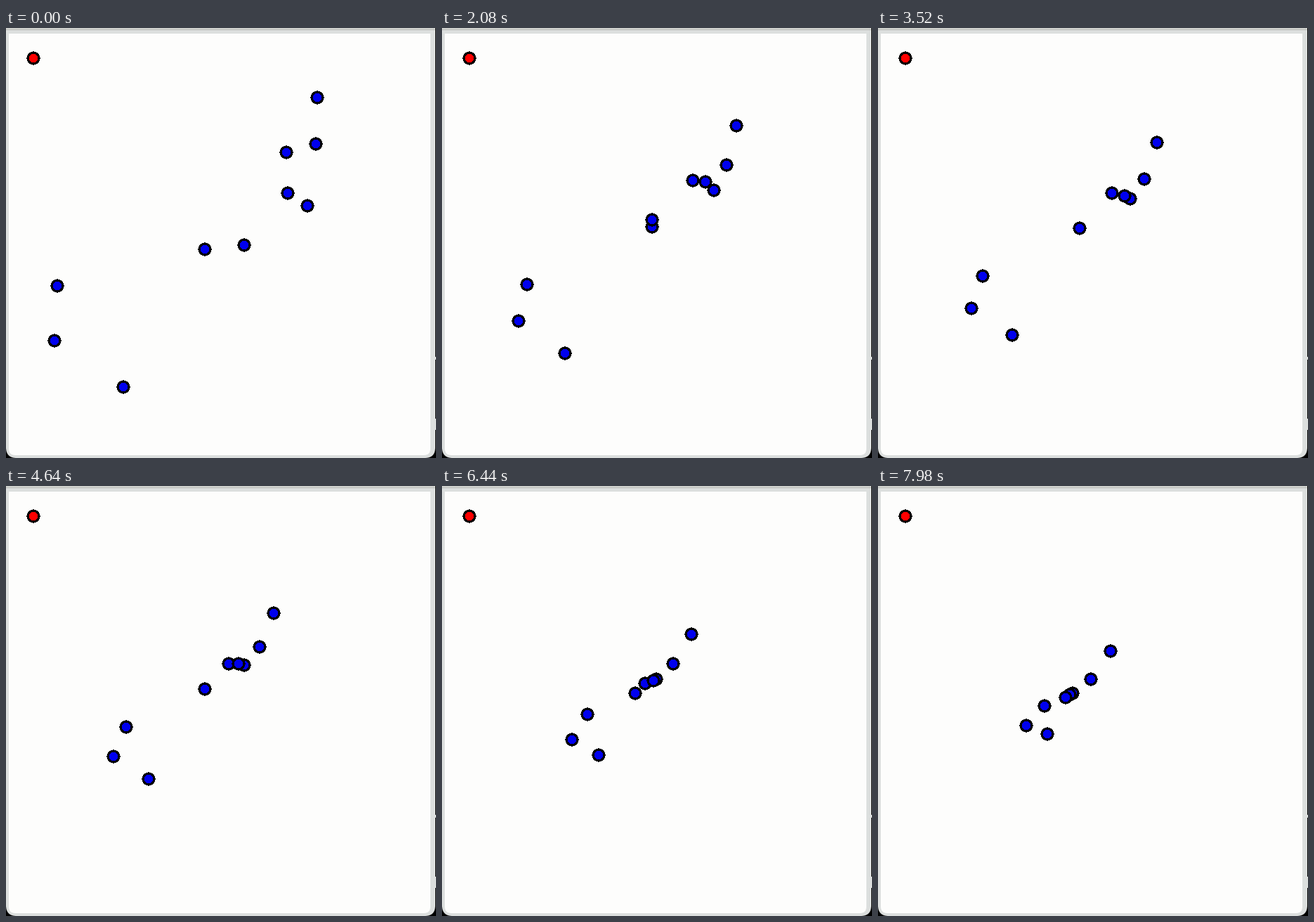
Write a matplotlib script that moves like this. It is 612 px wide and 612 px high and loops after 8000 ms.

```python
import numpy as np
import matplotlib.pyplot as plt
from matplotlib.animation import FuncAnimation
from matplotlib.patches import Circle, FancyBboxPatch, Rectangle

SIZE = 612
TICK = 20
FRAMES = 400

# Each dot's starting place and heading in degrees, back to front
SWARM = np.array([
    (443, 99, 120), (441, 165, 140), (429, 253, 215), (339, 309, 215),
    (401, 235, 210), (399, 177, 117), (283, 315, 297), (73, 367, 0),
    (69, 445, 325), (167, 511, 277),
], float)
START = SWARM[:, :2]
ANGLE = np.radians(SWARM[:, 2])
HEADING = np.column_stack([np.cos(ANGLE), np.sin(ANGLE)])


def length(v):
    return np.maximum(np.hypot(v[:, 0], v[:, 1]), 1e-6)[:, None]


def advance(pos, step):
    """Move every dot at one speed, turning from its heading to the centroid."""
    to_centre = pos.mean(axis=0) - pos
    gap = length(to_centre)
    keep = np.clip((60 - step) / 35, 0, 1)
    way = keep * HEADING + (1 - keep) * to_centre / gap
    speed = 1.01 + 0.25 * np.exp(-step / 14)
    return pos + way / length(way) * np.minimum(speed, gap)


def simulate():
    """Three steps in a row, then a pause, every seven ticks."""
    pos, step, states = START, 0, [START]
    for tick in range(1, FRAMES):
        if tick % 7 in (5, 6, 0):
            pos = advance(pos, step)
            step += 1
        states.append(2 * np.round((pos - 1) / 2) + 1)
    return states


STATES = simulate()

fig = plt.figure(figsize=(SIZE / 72, SIZE / 72), dpi=72, facecolor="black")
ax = fig.add_axes([0, 0, 1, 1])
ax.set_xlim(0, SIZE)
ax.set_ylim(SIZE, 0)
ax.axis("off")


def box(x0, y0, x1, y1, color):
    ax.add_patch(Rectangle((x0, y0), x1 - x0, y1 - y0, color=color, lw=0, zorder=1))


def panel(x0, y0, x1, y1, radius, color):
    style = f"round,pad=0,rounding_size={radius}"
    ax.add_patch(FancyBboxPatch((x0, y0), x1 - x0, y1 - y0, boxstyle=style,
                                fc=color, lw=0, zorder=1))


def dot(x, y, color):
    return ax.add_patch(Circle((x, y), 8, fc=color, ec="black", lw=2,
                               antialiased=False, zorder=2))


# Window frame: pale grey edge, rounded at the bottom, around a white field
EDGE, FIELD = "#dcdfde", "#fdfdfc"
box(0, 0, SIZE, SIZE, "black")
panel(0, -20, 611, 612, 15, EDGE)
panel(4, -20, 604, 608, 9, FIELD)
box(0, 0, 611, 8, EDGE)
box(0, 0, 611, 1, "#c8c9c4")
box(0, 2, 611, 3, "#b4b5b0")
box(611, 468, 612, 472, EDGE)
box(611, 556, 612, 572, EDGE)

dot(39, 43, "#ff0000")
dots = [dot(x, y, "#0000ee") for x, y in START]


def update(frame):
    for d, xy in zip(dots, STATES[frame]):
        d.set_center(xy)
    return dots


anim = FuncAnimation(fig, update, frames=FRAMES, interval=TICK,
                     repeat=True, repeat_delay=0, blit=False)
plt.show()
```
